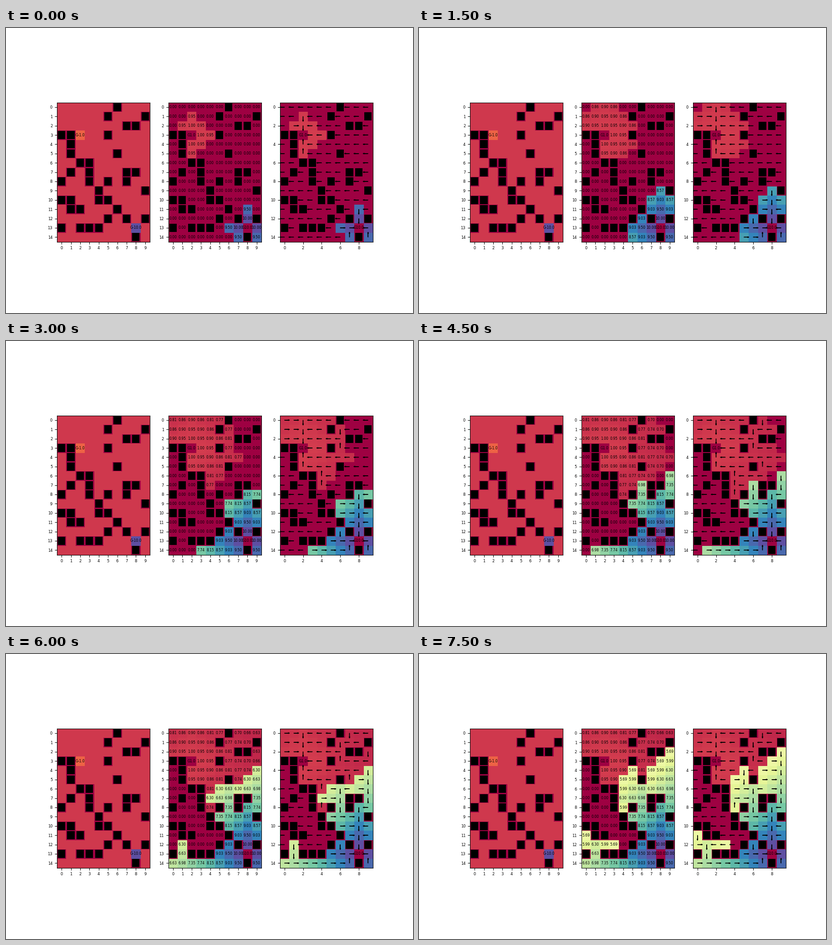
Recreate the animation shown at these times as a matplotlib script. Size 894 by 626 pixels, loop 8000 ms.

```python
import matplotlib.pyplot as plt
import numpy as np
from matplotlib.animation import FuncAnimation
from matplotlib.patches import Rectangle

# '#' wall, 'a' small goal, 'b' big goal
MAZE = """
......#...
.....#...#
.......##.
##a..#....
.#........
.#....#...
..##......
.#.#...##.
#..#.#.#..
....#....#
##..##....
.##...#...
.....#.#.#
#.###...b.
........#.
""".split()
ROWS, COLS = len(MAZE), len(MAZE[0])
REWARD = {"a": 1.0, "b": 10.0}
MOVES = [(0, -1), (0, 1), (-1, 0), (1, 0)]  # left, right, up, down
GAMMA = 0.95
STEP_MS, HOLD, TOTAL = 500, 3, 16
WIDTH, HEIGHT, DPI = 894, 626, 100

CELLS = [(r, c) for r in range(ROWS) for c in range(COLS)]
WALLS = [p for p in CELLS if MAZE[p[0]][p[1]] == "#"]
GOALS = {p: REWARD[MAZE[p[0]][p[1]]] for p in CELLS if MAZE[p[0]][p[1]] in REWARD}
FREE = [p for p in CELLS if MAZE[p[0]][p[1]] == "."]


def q_value(values, cell, move):
    nxt = cell[0] + move[0], cell[1] + move[1]
    if nxt in GOALS:
        return GOALS[nxt]
    return GAMMA * values[nxt if nxt in FREE else cell]


def sweep(values):
    new, policy = np.zeros_like(values), {}
    for cell in FREE:
        q = [q_value(values, cell, m) for m in MOVES]
        policy[cell] = MOVES[int(np.argmax(q))]
        new[cell] = max(q)
    return new, policy


def solve(count):
    """Values and policy after every second sweep."""
    values, stages = np.zeros((ROWS, COLS)), []
    for _ in range(count):
        values, _unused = sweep(values)
        values, policy = sweep(values)
        stages.append((values, policy))
    return stages


STAGES = solve((TOTAL + HOLD - 1) // HOLD)

plt.rcParams["font.family"] = "DejaVu Sans"
plt.rcParams["font.size"] = 6
fig, (ax_map, ax_val, ax_pol) = plt.subplots(1, 3, figsize=(WIDTH / DPI, HEIGHT / DPI), dpi=DPI)
fig.subplots_adjust(left=111.9 / WIDTH, right=805.5 / WIDTH,
                    bottom=1 - 558 / HEIGHT, top=1 - 75.2 / HEIGHT)


def label(ax, cell, text):
    return ax.text(cell[1], cell[0], text, ha="center", va="center", fontsize=5.5)


def board(ax, data, low, goal_mark):
    image = ax.imshow(data, cmap="Spectral", vmin=low, vmax=10)
    for r, c in WALLS:
        ax.add_patch(Rectangle((c - 0.4, r - 0.44), 0.8, 0.88, fc="black", lw=0, zorder=3))
    for cell, reward in GOALS.items():
        label(ax, cell, f"{goal_mark}{reward:.1f}")
    ax.set_xlim(-0.5, COLS - 0.5)
    ax.set_ylim(ROWS - 0.5, -0.5)
    return image


rewards = np.zeros((ROWS, COLS))
for cell in WALLS:
    rewards[cell] = -1
for cell, reward in GOALS.items():
    rewards[cell] = reward

board(ax_map, rewards, -1, "G-")
val_image = board(ax_val, STAGES[0][0], 0, "G")
pol_image = board(ax_pol, STAGES[0][0], 0, "G")
for ax in (ax_map, ax_val):
    ax.set_xticks(range(COLS))
    ax.set_yticks(range(ROWS))
ax_pol.set_xticks(range(0, COLS, 2))
ax_pol.set_yticks(range(0, ROWS, 2))

numbers = {cell: label(ax_val, cell, "") for cell in FREE}
arrows = []


def draw(frame):
    values, policy = STAGES[frame // HOLD]
    val_image.set_data(values)
    pol_image.set_data(values)
    for cell, text in numbers.items():
        text.set_text(f"{values[cell]:.2f}")
    while arrows:
        arrows.pop().remove()
    for (r, c), (dr, dc) in policy.items():
        arrows.append(ax_pol.arrow(c, r, 0.4 * dc, 0.4 * dr, head_width=0.1,
                                   head_length=0.15, fc="black", ec="black"))
    return [val_image, pol_image, *numbers.values(), *arrows]


anim = FuncAnimation(fig, draw, frames=TOTAL, init_func=lambda: draw(0),
                     interval=STEP_MS, repeat=True, repeat_delay=0, blit=False)
plt.show()
```
